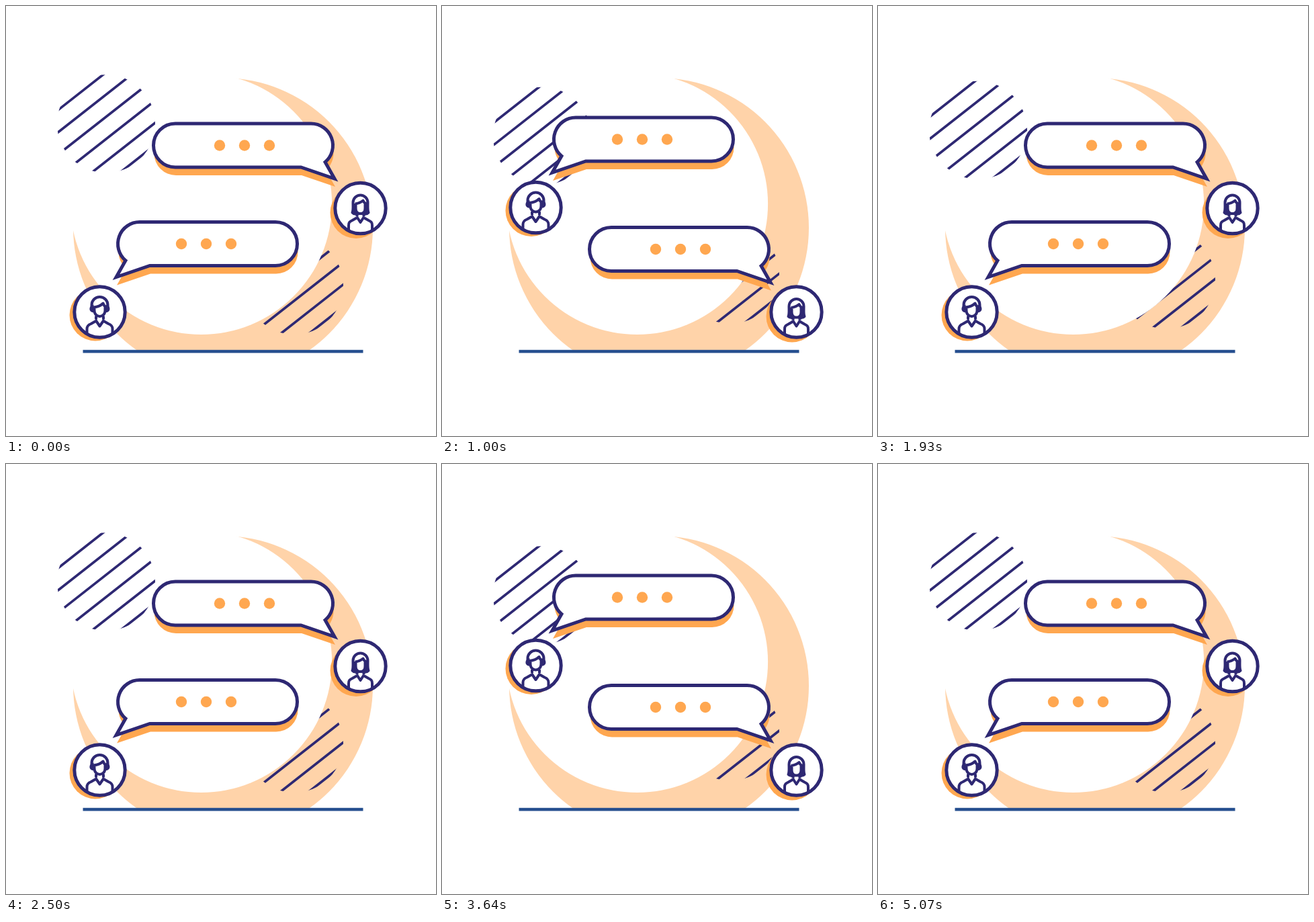
Animation, 640 px wide and 640 px high, one loop 5.14 s. Source, as an HTML page with a canvas:

```html
<!DOCTYPE html>
<html lang="en">
<head>
<meta charset="utf-8">
<title>Chat</title>
<style>
  html, body { margin: 0; width: 100%; height: 100%; overflow: hidden; background: #fff; }
  canvas { display: block; }
</style>
</head>
<body>
<canvas id="stage" width="640" height="640"></canvas>
<script>
const ctx = document.getElementById('stage').getContext('2d');
const NAVY = '#2e2873', ORANGE = '#ffa750', PEACH = '#ffd3a9', BLUE = '#264f8f';
const LOOP = 5140, STEPS = 72, CYCLE = 2525, MOVE = 610;
const FIRST = 50, SECOND = 1245;
const LOW = 455.5, RISE = 20;

const clamp = v => Math.min(1, Math.max(0, v));
const ease = (v, from = 0, to = 1) => {
  const u = clamp((v - from) / (to - from));
  return u * u * (3 - 2 * u);
};
const mix = (a, b, p) => a + (b - a) * p;

const bubble = new Path2D('M50-22H237a32.5 32.5 0 0 0 0-65H35A32.5 32.5 0 0 0 14-29.7L0-5Z');
const man = {
  x: 139.5, top: 300, tailX: 164, tailY: -47, side: 1, shade: 4.5,
  icon: new Path2D('M-12-6V-10.5a12 12 0 0 1 24 0V-6' +
    'M-8-9V-2C-8 3-4 6.5 0 6.5S8 3 8-2V-9M-9-7C-3-7.5 2-10 5-13Q6-9 10-7' +
    'M-5.5 6V11M5.5 6V11M-6.5 11.5L0 21L6.5 11.5' +
    'M-19 33V25C-19 21-17 19-13 17.5L-6 13.5M19 33V25C19 21 17 19 13 17.5L6 13.5'),
  fill: new Path2D('M-9-11C-17-10-17 1-9 .5ZM9-11C17-10 17 1 9 .5Z')
};
const woman = {
  x: 527.5, top: 301, tailX: 489, tailY: -39, side: -1, shade: 6.5,
  icon: new Path2D('M-6 8.5Q-10 9-12 6.5C-10.5 3-11-1-11-8.5a11 11 0 0 1 22 0C11-1 10.5 3 12 6.5Q10 9 6 8.5' +
    'M-7-7V0C-7 5-4 8 0 8S7 5 7 0V-7M-8-6.5C-3-7 1-9 4-11.5Q5-8 9-6.5' +
    'M-5 7V12M5 7V12M-5.5 12.5L0 21L5.5 12.5' +
    'M-17.5 33V25.5C-17.5 21-16 20-12 18L-5 14M17.5 33V25.5C17.5 21 16 20 12 18L5 14'),
  fill: new Path2D('M-11-5H-7V3L-5 8L-11 7ZM11-5H7V3L5 8L11 7Z')
};

function disc(x, y, r, color) {
  ctx.fillStyle = color;
  ctx.beginPath();
  ctx.arc(x, y, r, 0, 7);
  ctx.fill();
}

function placed(x, y, sx, sy, draw) {
  if (!sy) return;
  ctx.save();
  ctx.translate(x, y);
  ctx.scale(sx, sy);
  draw();
  ctx.restore();
}

function hatch(x, y) {
  ctx.save();
  ctx.translate(x, y);
  ctx.beginPath();
  ctx.arc(0, 0, 73, 0, 7);
  ctx.clip();
  ctx.beginPath();
  for (let i = 0; i < 6; i++) {
    const mid = -76.6 + 33.1 * i;
    ctx.moveTo(-80, mid + 80 * .785);
    ctx.lineTo(80, mid - 80 * .785);
  }
  ctx.strokeStyle = NAVY;
  ctx.lineWidth = 3.7;
  ctx.stroke();
  ctx.restore();
}

function message(who, y, faceSize, bubbleSize) {
  placed(who.x, y, faceSize, faceSize, () => {
    disc(-6.5, who.shade, 38.5, ORANGE);
    disc(0, 0, 37.7, '#fff');
    ctx.strokeStyle = ctx.fillStyle = NAVY;
    ctx.lineJoin = 'round';
    ctx.lineWidth = 4;
    ctx.stroke(who.icon);
    ctx.fill(who.fill);
    ctx.lineWidth = 5;
    ctx.beginPath();
    ctx.arc(0, 0, 37.7, 0, 7);
    ctx.stroke();
  });
  placed(who.tailX, y + who.tailY, bubbleSize * who.side, bubbleSize, () => {
    ctx.translate(who.side, 12);
    ctx.fillStyle = ORANGE;
    ctx.fill(bubble);
    ctx.translate(-who.side, -12);
    ctx.fillStyle = '#fff';
    ctx.fill(bubble);
    ctx.strokeStyle = NAVY;
    ctx.lineWidth = 5;
    ctx.stroke(bubble);
    for (const x of [97, 134, 171]) disc(x, -54.5, 8.2, ORANGE);
  });
}

// The older message shrinks away, the newer one rises, a fresh one pops in below.
function exchange(older, newer, u) {
  const p = ease(u);
  message(older, older.top, 1 - ease(u, .1, .45), 1 - ease(u, 0, .35));
  message(newer, mix(LOW, newer.top, p), 1, 1);
  message(older, LOW + RISE * (1 - p), ease(u, 0, .34), ease(u, .266, .898));
}

function draw(t) {
  const sway = ease(1 - Math.abs(2 * t / CYCLE - 1));
  ctx.fillStyle = '#fff';
  ctx.fillRect(0, 0, 640, 640);

  ctx.save();
  ctx.beginPath();
  ctx.rect(0, 0, 640, 513);
  ctx.clip();
  disc(323, 330, 223, PEACH);
  ctx.restore();
  hatch(429, 416 - 18.3 * sway);
  disc(290.5, 294.5, 194.6, '#fff');
  hatch(149, 175.3 + 20.7 * sway);

  if (t < SECOND) exchange(woman, man, clamp((t - FIRST) / MOVE));
  else exchange(man, woman, clamp((t - SECOND) / MOVE));

  ctx.fillStyle = BLUE;
  ctx.fillRect(114.5, 511.8, 417, 4.6);
}

function tick() {
  const step = Math.floor(((performance.now() + 5) % LOOP) / LOOP * STEPS);
  const t = step * LOOP / STEPS;
  draw(step === STEPS - 1 ? 0 : t % CYCLE);
  requestAnimationFrame(tick);
}
tick();
</script>
</body>
</html>
```
